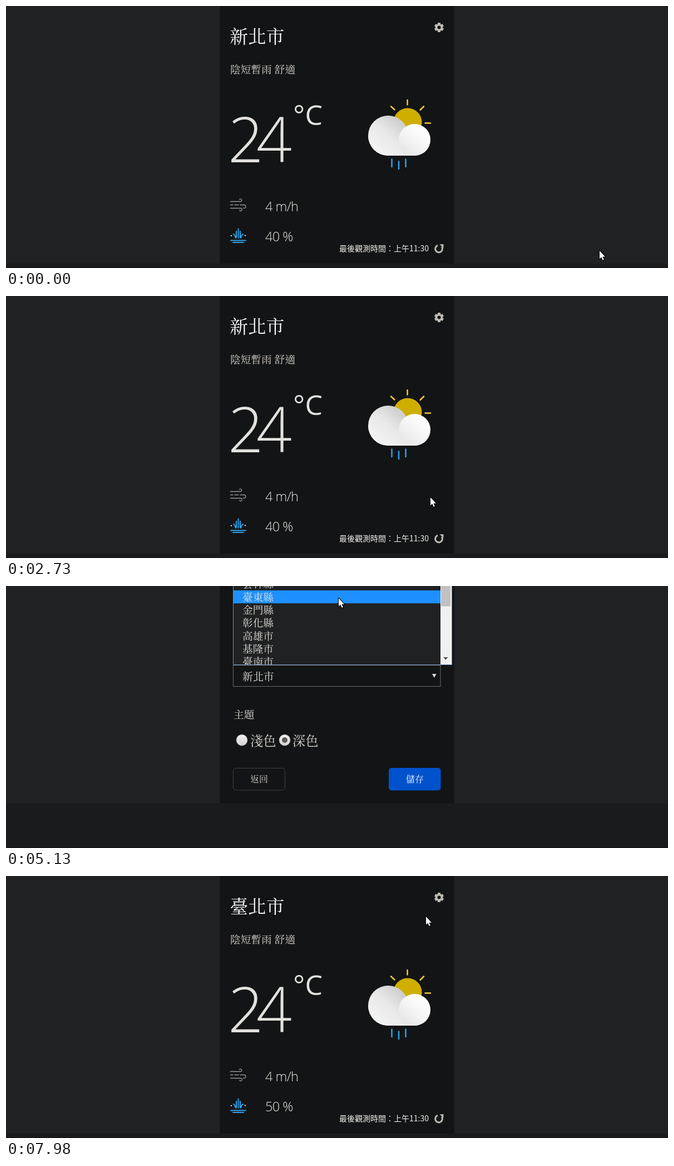
These frames come from a looping animation (1190x471 px, 8 s). An HTML page with a canvas:

```html
<!DOCTYPE html>
<html lang="zh-Hant-TW">
<head>
<meta charset="utf-8">
<title>Weather card</title>
<style>
html, body { margin: 0; width: 100%; height: 100%; overflow: hidden; background: #1a1b1c; }
canvas { display: block; }
</style>
</head>
<body>
<canvas id="stage" width="1190" height="471" lang="zh-Hant-TW"></canvas>
<script>
const ctx = document.getElementById('stage').getContext('2d');
const LOOP = 8000, TAU = Math.PI * 2;
const CJK = '"Noto Serif CJK TC", "Noto Sans CJK TC", "Noto Sans CJK JP", "Noto Sans CJK", sans-serif';
const CJK_SANS = '"Noto Sans CJK TC", "Noto Sans CJK JP", "Noto Sans CJK", sans-serif';
const LATIN = '"Open Sans", "Noto Sans", sans-serif';
const CARD = '#131415', PAGE = '#202122';
const GREY = '#bdbbb4', BLUE = '#2ea3ee';

const T = { settings: 3870, open: 4630, scroll: 5200, unscroll: 5650, close: 6360, saved: 7210 };
const CITIES = ['雲林縣', '臺東縣', '金門縣', '彰化縣', '高雄市', '基隆市', '臺南市',
  '新竹市', '屏東縣', '澎湖縣', '連江縣', '花蓮縣'];
const ROW = 23.3;

// Pointer moves: first step, last step, step count, end x, end y, sideways bend
const START = { x: 1067, y: 440 };
const MOVES = [
  [70, 800, 11, 773, 40, 0],
  [1870, 1870, 1, 776, 61, 0],
  [1950, 2420, 7, 776, 431, -4],
  [2570, 3330, 11, 765, 55, -20],
  [3410, 3640, 4, 780, 44, 0],
  [4020, 4400, 6, 591, 171, 0],
  [5030, 5200, 3, 600, -30, 0],
  [6530, 6530, 1, 537, 85, 0],
  [6605, 7060, 7, 725, 357, 0],
  [7210, 7980, 11, 755, 73, 0]
];

function pointerAt(t) {
  let { x, y } = START;
  for (const [t0, t1, n, ex, ey, bend] of MOVES) {
    if (t < t0) break;
    const gap = n > 1 ? (t1 - t0) / (n - 1) : 1;
    const step = Math.min(n, Math.floor((t - t0) / gap + 1e-6) + 1);
    const u = step / n, k = u * u * (3 - 2 * u);
    x += (ex - x) * k + bend * Math.sin(Math.PI * k);
    y += (ey - y) * k;
  }
  return { x: Math.round(x), y: Math.round(y) };
}

function rect(x, y, w, h, color) {
  ctx.fillStyle = color;
  ctx.fillRect(x, y, w, h);
}

function disc(x, y, r, color) {
  ctx.fillStyle = color;
  ctx.beginPath();
  ctx.arc(x, y, r, 0, TAU);
  ctx.fill();
}

function poly(points, color) {
  ctx.beginPath();
  points.forEach(([x, y]) => ctx.lineTo(x, y));
  ctx.closePath();
  ctx.fillStyle = color;
  ctx.fill();
}

function stroke(path, color, width, cap = 'round') {
  ctx.strokeStyle = color;
  ctx.lineWidth = width;
  ctx.lineCap = cap;
  ctx.stroke(new Path2D(path));
}

function roundBox(x, y, w, h, r) {
  ctx.beginPath();
  ctx.roundRect(x, y, w, h, r);
}

function text(str, x, y, font, color, align = 'left', spacing = 0) {
  ctx.font = font;
  ctx.fillStyle = color;
  ctx.textAlign = align;
  ctx.letterSpacing = spacing + 'px';
  ctx.fillText(str, x, y);
}

// Chinese text placed by the vertical centre of its glyphs
function han(str, x, cy, size, color, align) {
  text(str, x, cy + size * 0.38, `300 ${size}px ${CJK}`, color, align);
}

function backdrop(bottom) {
  rect(0, 0, 1190, 471, '#1a1b1c');
  rect(0, 0, 1190, bottom, PAGE);
  rect(384, 0, 422, bottom, '#18191a');
  rect(385, 0, 420, bottom, CARD);
  rect(0, 470, 1190, 1, '#101112');
}

function gear(x, y) {
  ctx.save();
  ctx.translate(x, y);
  disc(0, 0, 6.4, GREY);
  for (let i = 0; i < 6; i++) {
    poly([[-3, -5], [-2.2, -8.5], [2.2, -8.5], [3, -5]], GREY);
    ctx.rotate(TAU / 6);
  }
  disc(0, 0, 3, CARD);
  ctx.restore();
}

function refresh(x, y) {
  ctx.strokeStyle = GREY;
  ctx.lineWidth = 3;
  ctx.lineCap = 'butt';
  ctx.beginPath();
  ctx.arc(x, y, 6.4, -0.6, 4.4);
  ctx.stroke();
  poly([[x + 1.5, y - 8], [x + 8.5, y - 8.3], [x + 8.3, y - 1.5]], GREY);
}

function windIcon() {
  const color = '#97989a';
  stroke('M403.5 351.5H421.5a2.3 2.3 0 1 0-2-3.5', color, 1.3);
  stroke('M403.5 357.5H408M411 357.5H418M421 357.5H428a3 3 0 1 1-1.5 5.6', color, 1.3);
  stroke('M403.5 363.5H422a2.5 2.5 0 1 1-2.2 3.8', color, 1.3);
}

function rainIcon() {
  stroke('M404 421.5H431M408 425H427', BLUE, 2);
  stroke('M417.5 400.5V417M414 405V416M421 405V416', BLUE, 2);
  stroke('M409 410Q412 412 413 417M426 410Q423 412 422 417', BLUE, 2);
  disc(405, 413, 1.3, '#a9d6f2');
  disc(430, 412.5, 1.3, '#a9d6f2');
}

function gradient(x0, y0, x1, y1, ...colors) {
  const g = ctx.createLinearGradient(x0, y0, x1, y1);
  colors.forEach((c, i) => g.addColorStop(i / (colors.length - 1), c));
  return g;
}

function weatherIcon() {
  disc(722, 209, 25.5, '#cfae00');
  stroke('M721.5 169V177.5M692 180.5L698.5 186.5M751 180.5L744.5 187M753.5 210.5H763', '#f5c93f', 2.5);
  const shade = gradient(672, 258, 712, 212, '#f2f2f2', '#e8e8e8', '#d0d0d0');
  roundBox(651, 233, 111, 36, [0, 0, 28, 36]);
  ctx.fillStyle = shade;
  ctx.fill();
  disc(687, 233, 36, shade);
  disc(734.5, 240.5, 28.5, gradient(715, 262, 750, 220, '#e7e7e7', '#f4f4f4', '#ffffff'));
  stroke('M693.5 275.5V289M706 279.5V293M718.5 275.5V289', BLUE, 2.5);
}

function weather(city, humidity) {
  const reading = `300 23.6px ${LATIN}`;
  backdrop(463);
  han(city, 402.5, 55, 32.6, '#fff');
  gear(778.5, 38.5);
  han('陰短暫雨 舒適', 403, 113.8, 18.7, '#d8d5cf');
  text('24', 399, 281, `300 112px ${LATIN}`, '#e2e1dd', 'left', -13);
  text('°C', 516, 213.5, `400 50px ${LATIN}`, '#e2e1dd');
  weatherIcon();
  windIcon();
  text('4 m/h', 466, 368.5, reading, '#e6e4e0', 'left', -0.6);
  rainIcon();
  text(humidity + ' %', 466, 422.5, reading, '#e6e4e0', 'left', -0.6);
  text('最後觀測時間：上午11:30', 599, 441, `400 14px ${CJK_SANS}`, '#f2f0ec');
  refresh(778, 436.5);
}

function radio(x, y, on) {
  disc(x, y, 10.3, '#a5a5a5');
  disc(x, y, 9.6, gradient(x, y - 9, x, y + 9, '#f0efed', '#d6d5d3'));
  if (on) disc(x, y, 5, '#5c5b58');
}

function settings(city) {
  backdrop(391);
  han('設定', 408.5, 44, 32.6, '#fff');
  han('地區', 409, 114, 18.7, '#e0ddd8');
  ctx.lineWidth = 1;
  ctx.strokeStyle = '#6c6c6c';
  ctx.strokeRect(408.5, 142.5, 372.5, 38);
  han(city, 425, 162.5, 18.9, '#e8e6e2');
  poly([[766, 158], [773.5, 158], [769.75, 165]], '#e0ddd8');
  han('主題', 409, 231, 18.7, '#e0ddd8');
  radio(424, 277, false);
  han('淺色', 439, 278, 23.3, '#d8d5cf');
  radio(501, 277, true);
  han('深色', 515, 278, 23.3, '#d8d5cf');
  roundBox(408.5, 327.5, 93, 39.5, 5);
  ctx.lineWidth = 1;
  ctx.strokeStyle = '#404142';
  ctx.stroke();
  han('返回', 455, 347, 16, '#d8d5cf', 'center');
  roundBox(688, 327, 93.5, 40.5, 5);
  ctx.fillStyle = '#0052cc';
  ctx.fill();
  han('儲存', 735, 347, 16, '#fff', 'center');
}

function dropdown(scroll, hoverY) {
  ctx.save();
  ctx.beginPath();
  ctx.rect(408, 0, 394, 142);
  ctx.clip();
  rect(408, 0, 394, 142, '#6f92bd');
  rect(409, 0, 392, 141, PAGE);
  ctx.beginPath();
  ctx.rect(409, 0, 392, 141);
  ctx.clip();
  CITIES.forEach((name, i) => {
    const cy = -3.8 + i * ROW - scroll;
    if (hoverY !== null && Math.abs(hoverY - cy) < ROW / 2) {
      rect(409, cy - ROW / 2, 372, ROW, '#1e90ff');
    }
    han(name, 425, cy, 18.7, '#e2e0db');
  });
  rect(781, 0, 20, 141, '#f1f1f1');
  rect(782, 0, 17, 36.5 + scroll * 0.73, '#c1c1c1');
  poly([[786, 128], [794.5, 128], [790.25, 132.5]], '#505050');
  ctx.restore();
}

function tooltip(alpha) {
  ctx.save();
  ctx.globalAlpha = alpha;
  ctx.shadowColor = 'rgba(0,0,0,.6)';
  ctx.shadowBlur = 3;
  ctx.shadowOffsetX = ctx.shadowOffsetY = 2;
  roundBox(774.5, 61.5, 35, 21, 2);
  ctx.fillStyle = gradient(0, 61, 0, 83, '#ffffff', '#e4e5f0');
  ctx.fill();
  ctx.shadowColor = 'transparent';
  ctx.strokeStyle = '#767676';
  ctx.lineWidth = 1;
  ctx.stroke();
  text('cog', 779, 77, `400 15px ${LATIN}`, '#5b5f6b');
  ctx.restore();
}

const ARROW = new Path2D('M0 0V14.6L3.3 11.5L5.6 17L7.8 16L5.5 10.7H10Z');
const HAND = new Path2D('M-1.5 1.5Q0 -1 1.5 1.5V7Q3.5 6 4.3 7.7Q6.3 7 7 8.7Q9.3 8.3 9.3 10.5' +
  'V14Q9 16.5 7.5 19H-1Q-1.5 16.5 -4.7 12.2Q-5.4 10 -3.6 10L-1.5 12Z');

function pointer({ x, y }, hand) {
  const shape = hand ? HAND : ARROW;
  ctx.save();
  ctx.translate(x, y);
  ctx.lineJoin = 'round';
  ctx.lineWidth = 2;
  ctx.strokeStyle = '#000';
  ctx.stroke(shape);
  ctx.fillStyle = '#fff';
  ctx.fill(shape);
  if (hand) stroke('M1.7 8V11.5M4.4 8.5V11.5M7 9.5V12', '#333', 0.9);
  ctx.restore();
}

function draw(t) {
  const at = pointerAt(t);
  const inSettings = t >= T.settings && t < T.saved;
  if (!inSettings) {
    const saved = t >= T.saved;
    weather(saved ? '臺北市' : '新北市', saved ? 50 : 40);
  } else {
    settings(t < T.close ? '新北市' : '臺北市');
  }
  if (t >= T.open && t < T.close) {
    const scroll = t >= T.scroll && t < T.unscroll ? 100 : 0;
    dropdown(scroll, at.y > 0 && at.y < 141 ? at.y : null);
  }
  if (t >= 1180 && t < 1950) tooltip(Math.min(3, Math.floor((t - 1180) / 80) + 1) / 3);
  const onSave = inSettings && at.x >= 688 && at.x <= 782 && at.y >= 327 && at.y <= 367;
  pointer(at, onSave);
}

const begin = performance.now();
function frame() {
  draw((performance.now() - begin) % LOOP);
  requestAnimationFrame(frame);
}
frame();
</script>
</body>
</html>
```
